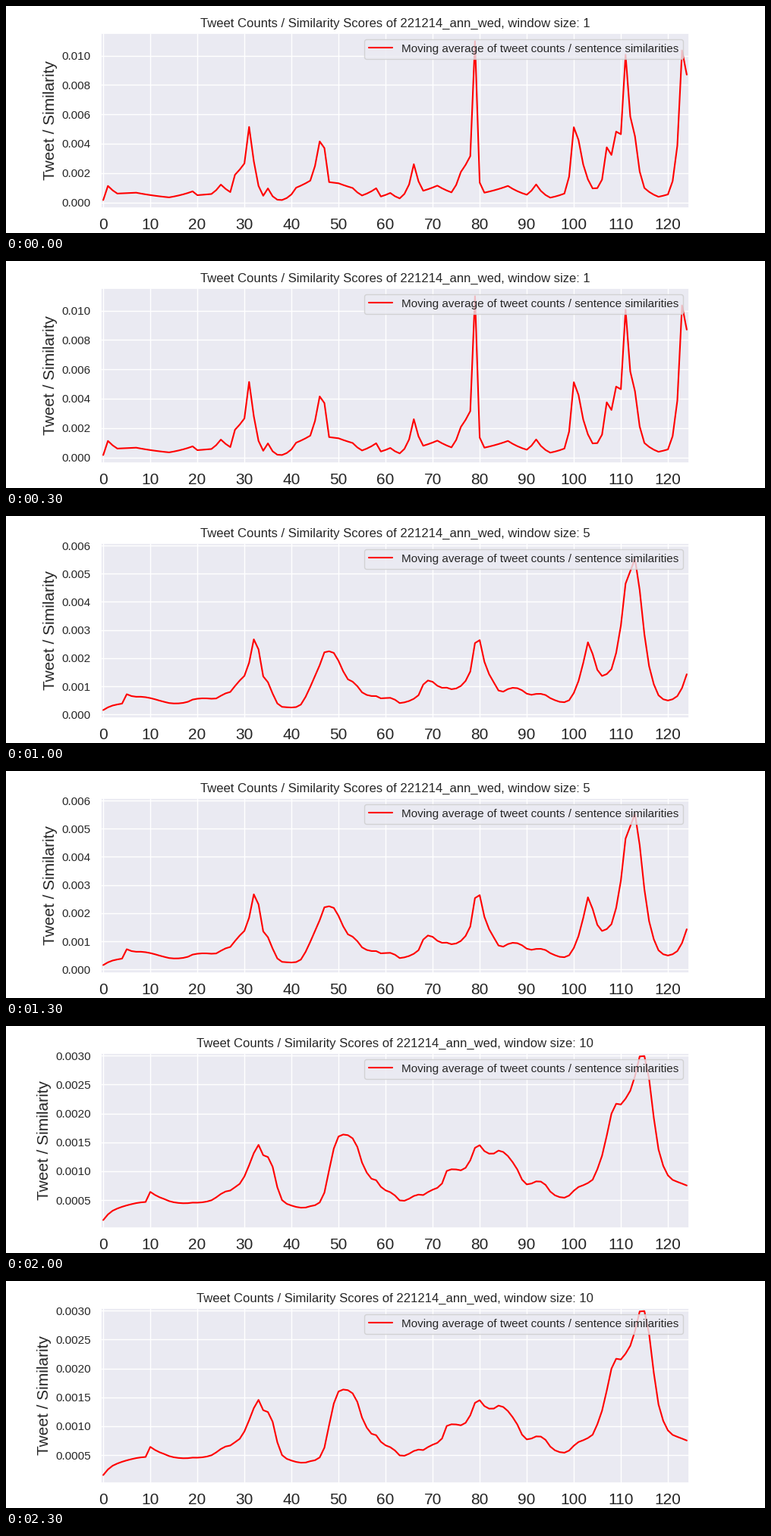
Write a matplotlib script that moves like this. It is 1000 by 300 pixels and loops after 2500 ms.

```python
import matplotlib.pyplot as plt
import numpy as np
from matplotlib.animation import FuncAnimation

INK = "0.15"
plt.rcParams.update({
    "font.family": "Liberation Sans",
    "text.color": INK,
    "axes.labelcolor": INK,
    "axes.facecolor": "#EAEAF2",
    "axes.edgecolor": "white",
    "axes.linewidth": 1.25,
    "axes.axisbelow": True,
    "axes.grid": True,
    "axes.titlesize": 12,
    "grid.color": "white",
    "grid.linewidth": 1,
    "lines.solid_capstyle": "round",
    "patch.linewidth": 1,
    "legend.fontsize": 11,
    "xtick.color": INK,
    "ytick.color": INK,
    "xtick.labelsize": 15,
    "ytick.labelsize": 11,
    "xtick.major.size": 6,
    "ytick.major.size": 6,
    "xtick.bottom": False,
    "ytick.left": False,
})

SAMPLES = 125
TYPICAL = 70
LOWEST = 0.000155
# Window size and the highest value its axis has to hold.
VIEWS = [(1, 0.01098), (3, 0.006635), (5, 0.0058), (7, 0.004895), (10, 0.002904)]

# Turning points (sample, ratio in 1e-5); the ratio moves geometrically between.
TURNS = [
    (0, 15.5), (1, 112), (3, 60), (7, 66), (14, 34), (19, 75), (20, 49),
    (23, 57), (25, 121), (27, 70), (28, 188), (30, 265), (31, 514), (32, 280),
    (34, 45), (35, 95), (37, 18), (38, 16), (41, 100), (44, 148), (46, 415),
    (47, 370), (48, 138), (50, 130), (53, 98), (55, 47), (58, 96), (59, 40),
    (61, 64), (63, 27), (66, 260), (68, 79), (71, 114), (74, 68), (76, 207),
    (78, 315), (79, 1098), (80, 135), (81, 66), (86, 112), (90, 52), (92, 122),
    (95, 32), (98, 60), (100, 512), (101, 425), (104, 95), (105, 97),
    (106, 155), (107, 375), (108, 323), (109, 482), (110, 464), (111, 1006),
    (112, 585), (113, 450), (115, 98), (118, 38), (120, 54), (123, 1035),
    (124, 870),
]

samples = np.arange(SAMPLES)
turn_at, turn_ratio = np.transpose(TURNS)
ratios = np.exp(np.interp(samples, turn_at, np.log(turn_ratio)))

# Tweets increase away from the typical ratio and tail off at the end.
counts = 1 + 0.25 * np.abs(np.log(ratios / TYPICAL))
counts *= np.minimum(1, (SAMPLES - samples) / 4)
similarities = counts / (ratios * 1e-5)


def trailing_sum(values, window):
    total = np.cumsum(values)
    result = total.copy()
    result[window:] -= total[:-window]
    return result


def smoothed_ratio(window):
    return trailing_sum(counts, window) / trailing_sum(similarities, window)


fig, ax = plt.subplots(figsize=(10, 3), dpi=100)
fig.subplots_adjust(left=0.125, right=0.9, bottom=0.11, top=0.88)
line, = ax.plot(samples, smoothed_ratio(1), color="red", lw=1.5,
                label="Moving average of tweet counts / sentence similarities")
ax.set_xlim(-0.5, SAMPLES - 0.5)
ax.set_xticks(range(0, SAMPLES, 10))
ax.set_ylabel("Tweet / Similarity", fontsize=15)
ax.legend(loc="upper right")


def draw(index):
    window, peak = VIEWS[index]
    margin = 0.05 * (peak - LOWEST)
    line.set_ydata(smoothed_ratio(window))
    ax.set_ylim(LOWEST - margin, peak + margin)
    ax.set_title("Tweet Counts / Similarity Scores of 221214_ann_wed, "
                 f"window size: {window}")
    return line,


anim = FuncAnimation(fig, draw, frames=len(VIEWS), interval=500, repeat=True)
plt.show()
```
